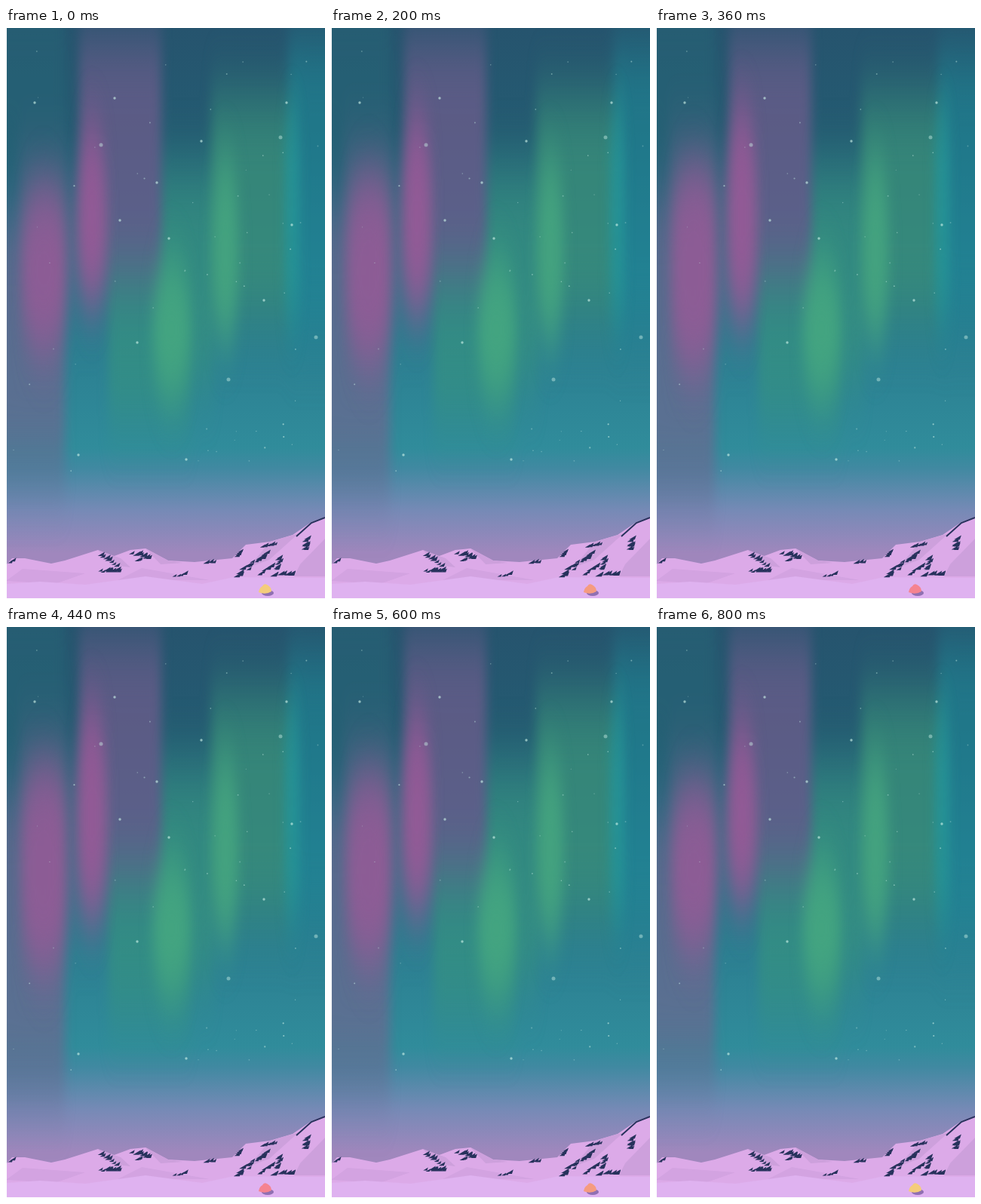
An HTML page for the animation above (840 ms loop, 423x757 px).

```html
<!DOCTYPE html>
<html lang="en">
<head>
<meta charset="utf-8">
<title>Aurora over snowy mountains</title>
<style>
  html, body { margin: 0; width: 100%; height: 100%; overflow: hidden; background: #fff; }
  svg { display: block; width: 423px; height: 757px; }
</style>
</head>
<body>
<svg viewBox="0 0 423 757">
  <defs>
    <linearGradient id="sky" x2="0" y2="1">
      <stop offset="0" stop-color="#26546e"/>
      <stop offset=".18" stop-color="#245b72"/>
      <stop offset=".4" stop-color="#277287"/>
      <stop offset=".735" stop-color="#308c9b"/>
      <stop offset=".77" stop-color="#4089a1"/>
      <stop offset=".845" stop-color="#768ab6"/>
      <stop offset=".92" stop-color="#a087bd"/>
    </linearGradient>
    <filter id="curtainBlur" filterUnits="userSpaceOnUse" x="-60" y="-150" width="560" height="1060" color-interpolation-filters="sRGB">
      <feGaussianBlur stdDeviation="7 42"/>
    </filter>
    <filter id="glowBlur" filterUnits="userSpaceOnUse" x="-60" y="-150" width="560" height="1060" color-interpolation-filters="sRGB">
      <feGaussianBlur stdDeviation="8 36"/>
    </filter>
    <clipPath id="stage"><rect x="1" width="422" height="756"/></clipPath>
  </defs>
  <g clip-path="url(#stage)">
    <rect width="423" height="757" fill="url(#sky)"/>
    <g id="curtains" filter="url(#curtainBlur)"/>
    <g id="glows" filter="url(#glowBlur)"/>
    <g id="stars" fill="#c9efe6"/>

    <path fill="#dcaae8" d="M0 712 8 703 25 703 60 710 78 706 122 692 138 702 165 692 185 690 215 706 250 708 300 703 318 685 350 681 380 672 405 655 423 648V757H0Z"/>
    <path fill="#cda0dc" d="M122 692 152 703 165 715 140 712ZM185 690 215 706 235 709 205 711ZM350 681 388 670 349 705 322 715ZM423 677 390 711 382 727H423Z"/>
    <path fill="#d3a3e1" d="M0 733 22 717 105 723 65 737ZM148 732 180 716 270 732Z"/>
    <path fill="#dfb2f0" d="M0 737 45 734 105 738 185 727 260 737 302 728 423 729V757H0Z"/>
    <path id="rocks" fill="#27325c"/>
    <path fill="none" stroke="#27325c" stroke-width="2" d="M385 674 405 656 423 649"/>
    <ellipse cx="347" cy="749" rx="8" ry="4" fill="#9070b2"/>
    <path id="tent" d="M335 748Q336 742 340 740 342 736 346 738 352 741 352 747 344 752 335 748Z"/>
  </g>
</svg>
<script>
const STEP = 40, STEPS = 21, HALF = 10;
const byId = id => document.getElementById(id);

let seed = 7;
function random(min, max) {
  seed = (seed * 16807) % 2147483647;
  return min + (max - min) * seed / 2147483647;
}

function add(parent, tag, attrs) {
  const node = document.createElementNS('http://www.w3.org/2000/svg', tag);
  for (const key in attrs) node.setAttribute(key, attrs[key]);
  return byId(parent).appendChild(node);
}

// Each beam lengthens by `grow` at both ends towards the middle of the loop.
const beams = [];
function curtain(left, right, top, bottom, fill, opacity, grow = 0) {
  const node = add('curtains', 'rect', { x: left, width: right - left, fill, opacity });
  beams.push({ node, top, bottom, grow });
}
function glow(cx, rx, top, bottom, fill, opacity, grow = 0) {
  const node = add('glows', 'rect', { x: cx - rx, width: 2 * rx, rx, ry: 90, fill, opacity });
  beams.push({ node, top, bottom, grow });
}

const purple = '#72648f', pink = '#a2589a', green = '#38957f', lime = '#49ab81', teal = '#1f8a9a';
curtain(-60, 78, -60, 190, '#276577', .6);
curtain(97, 206, 15, 330, '#6e5c8c', .75);
curtain(60, 136, 215, 365, purple, .55, 30);
curtain(-60, 78, 250, 590, purple, .65, 30);
curtain(18, 80, 175, 420, purple, .55, 30);
curtain(272, 388, 95, 385, '#3a8f7a', .8);
curtain(207, 275, 190, 465, green, .68);
curtain(136, 245, 325, 515, green, .62);
curtain(374, 460, 20, 410, teal, .6, -20);

glow(50, 28, 210, 430, pink, .65, 30);
glow(114, 18, 130, 365, pink, .72, 25);
glow(219, 26, 310, 490, lime, .75);
glow(291, 17, 175, 420, lime, .75);
glow(379, 8, 120, 390, '#229ca1', .6);

function star(cx, cy, r, opacity) {
  add('stars', 'circle', { cx, cy, r, opacity });
}
for (const point of '126,155 364,145 295,466 411,410'.split(' ')) star(...point.split(','), 2.5, .45);
for (const point of '38,99 144,93 372,99 151,255 200,205 259,150 379,261 342,361 174,417 239,572 96,566 216,279'.split(' ')) {
  star(...point.split(','), 1.7, .65);
}
for (let i = 0; i < 55; i++) star(random(10, 415), random(30, 605), random(.6, 1.1), random(.25, .65));

// Scatters thin slanted splinters of bare rock along a line.
function rock(x0, y0, x1, y1, count, spread) {
  let path = '';
  for (let i = 0; i < count; i++) {
    const t = (i + .5) / count, length = random(6, 11);
    const x = x0 + (x1 - x0) * t + random(-spread, spread) - length / 2;
    const y = y0 + (y1 - y0) * t + random(-spread, spread) / 2;
    path += `M${x} ${y + 2}l${length} ${-length * .6} ${-length * .2} ${length * .6}Z`;
  }
  byId('rocks').setAttribute('d', (byId('rocks').getAttribute('d') || '') + path);
}
rock(4, 709, 10, 704, 2, 1);
rock(124, 697, 149, 713, 7, 1);
rock(125, 719, 148, 718, 11, 3);
rock(168, 696, 193, 702, 9, 3);
rock(172, 705, 180, 703, 3, 1);
rock(222, 726, 240, 723, 4, 1);
rock(265, 708, 277, 707, 3, 1);
rock(306, 700, 312, 692, 4, 1);
rock(338, 687, 358, 683, 5, 1);
rock(306, 726, 348, 694, 17, 3);
rock(336, 725, 352, 713, 7, 2);
rock(356, 725, 382, 722, 9, 3);
rock(358, 718, 364, 700, 8, 2);
rock(400, 676, 397, 691, 9, 4);

function draw() {
  const step = Math.floor(performance.now() / STEP) % STEPS;
  const swell = 1 - Math.abs(1 - step / HALF);
  for (const { node, top, bottom, grow } of beams) {
    node.setAttribute('y', top - grow * swell);
    node.setAttribute('height', bottom - top + 2 * grow * swell);
  }
  byId('tent').setAttribute('fill', `hsl(${40 - 52 * swell}, 85%, ${72 + 2 * swell}%)`);
  requestAnimationFrame(draw);
}
draw();
</script>
</body>
</html>
```
